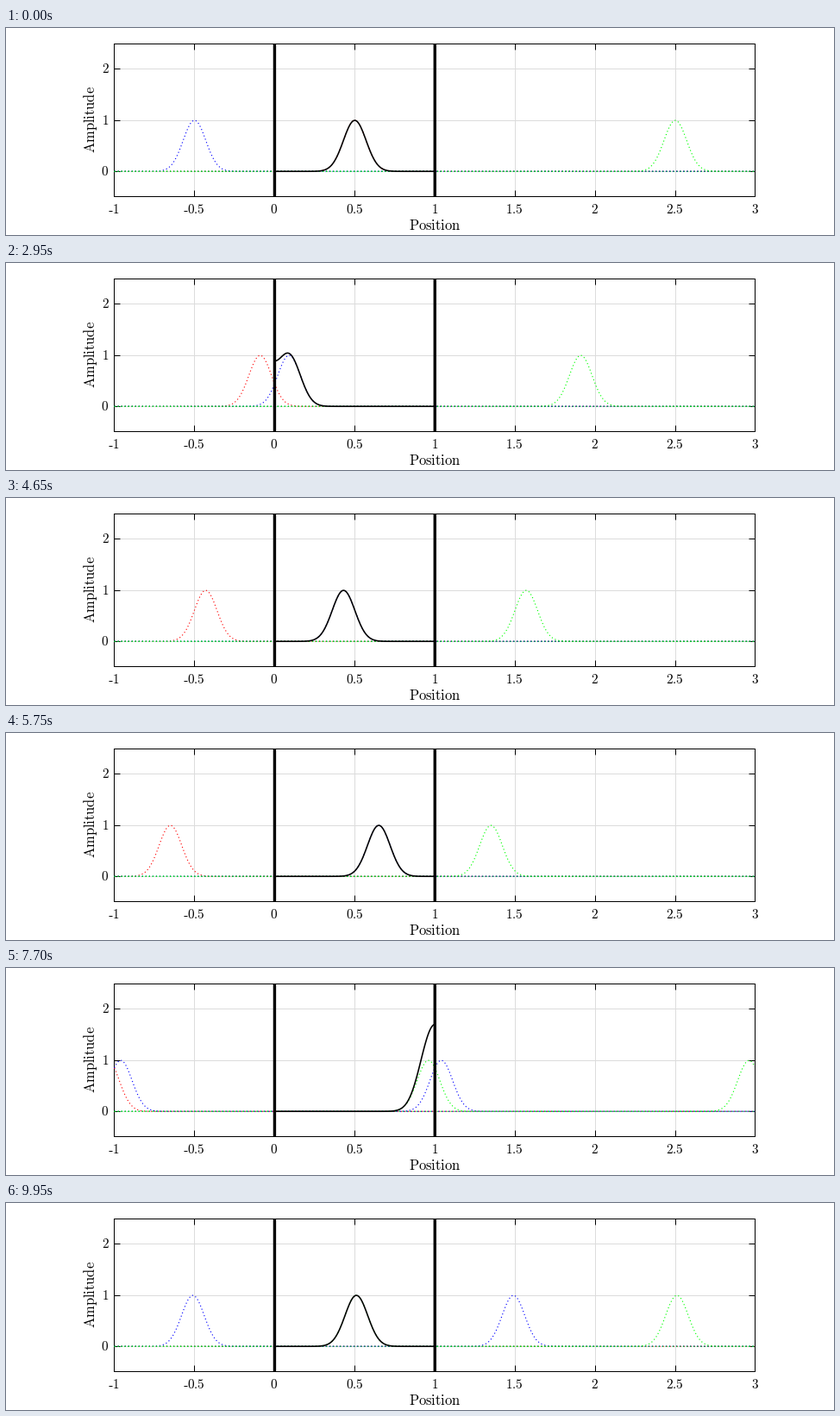
A matplotlib script that plays this animation: 960 px wide and 240 px high, repeating every 10000 ms.

```python
import numpy as np
import matplotlib.pyplot as plt
from matplotlib.animation import FuncAnimation
from matplotlib.lines import Line2D
from matplotlib.transforms import Affine2D

W, H, DPI = 960, 240, 100
LEFT, RIGHT, TOP, BOTTOM = 125.1, 868.45, 17.9, 195.3
FRAMES, INTERVAL = 200, 50
STEP = 0.01  # distance travelled per frame
TICK_EM, LABEL_EM = 15.2, 16.5
BLACK, GRID = "#000000", "#dcdcdc"

plt.rcParams["mathtext.fontset"] = "cm"
plt.rcParams["path.simplify"] = False


def pt(px):
    return px * 72 / DPI


def pulse(x, centre):
    return np.exp(-100 * (x - centre) ** 2)


fig = plt.figure(figsize=(W / DPI, H / DPI), dpi=DPI, facecolor="white")
ax = fig.add_axes([LEFT / W, 1 - BOTTOM / H,
                   (RIGHT - LEFT) / W, (BOTTOM - TOP) / H])
ax.set(xlim=(-1, 3), ylim=(-0.5, 2.5),
       xticks=np.arange(-1, 3.1, 0.5), yticks=[0, 1, 2])
ax.tick_params(direction="in", length=pt(7), width=pt(1), color=BLACK,
               top=True, right=True, labelbottom=False, labelleft=False)
ax.grid(color=GRID, linewidth=pt(1))
ax.set_axisbelow(True)
for spine in ax.spines.values():
    spine.set_linewidth(pt(1))

# Grid and frame snap to pixel centres; curves follow by half a pixel.
centred = ax.transData + Affine2D().translate(0.5, -0.5)


def curve(x, y, **style):
    return ax.plot(x, y, transform=centred, snap=False, **style)[0]


def label(x, y, text, em, ha="center", **kw):
    fig.text(x / W, 1 - y / H, rf"$\mathrm{{{text}}}$", fontsize=pt(em),
             color=BLACK, ha=ha, va="baseline", **kw)


def x_label(value, y=215):
    """Centred number; negative ones get a short hyphen as sign."""
    x = LEFT + (value + 1) / 4 * (RIGHT - LEFT)
    text = f"{abs(value):g}"
    if value < 0:
        width = 0.333 + 0.5 * len(text.replace(".", "")) + 0.278 * text.count(".")
        start = x - width * TICK_EM / 2
        ends = np.array([start + 0.011 * TICK_EM, start + 0.276 * TICK_EM])
        level = 1 - (y - 0.216 * TICK_EM) / H
        fig.add_artist(Line2D(ends / W, [level, level], color=BLACK,
                              linewidth=pt(1), solid_capstyle="butt"))
        x += 0.333 * TICK_EM / 2
    label(x, y, text, TICK_EM)


for value in np.arange(-1, 3.1, 0.5):
    x_label(value)
for value in (0, 1, 2):
    y = BOTTOM - (value + 0.5) / 3 * (BOTTOM - TOP)
    label(119.5, y + 4.9, str(value), TICK_EM, ha="right")
label(497, 234, "Position", LABEL_EM)
label(103, 106, "Amplitude", LABEL_EM, rotation=90, rotation_mode="anchor")

# start, direction, colour of each travelling pulse
WAVES = [
    (0.5, -1, "#ff0000"),
    (-0.5, 1, "#0000ff"),
    (-2.5, 1, "#0000ff"),
    (2.5, -1, "#00ff00"),
    (4.5, -1, "#00ff00"),
]
xs = np.linspace(-1, 3, 801)
inside = np.linspace(0, 1, 201)

dotted = [curve(xs, 0 * xs, color=colour, linewidth=pt(1.15), zorder=3,
                linestyle=(0, (1, 2.5)), dash_capstyle="butt")
          for _, _, colour in WAVES]
total = curve(inside, 0 * inside, color=BLACK, linewidth=pt(1.6), zorder=5)
for wall in (0, 1):
    curve([wall, wall], [-0.5, 2.5], color=BLACK, linewidth=pt(3.4), zorder=6,
          solid_capstyle="butt")


def update(frame):
    height = 0 * inside
    for line, (start, direction, _) in zip(dotted, WAVES):
        centre = start + direction * STEP * frame
        line.set_ydata(pulse(xs, centre))
        height = height + pulse(inside, centre)
    total.set_ydata(height)
    return [*dotted, total]


anim = FuncAnimation(fig, update, frames=FRAMES, interval=INTERVAL,
                     repeat=True, repeat_delay=0, blit=False)
plt.show()
```
